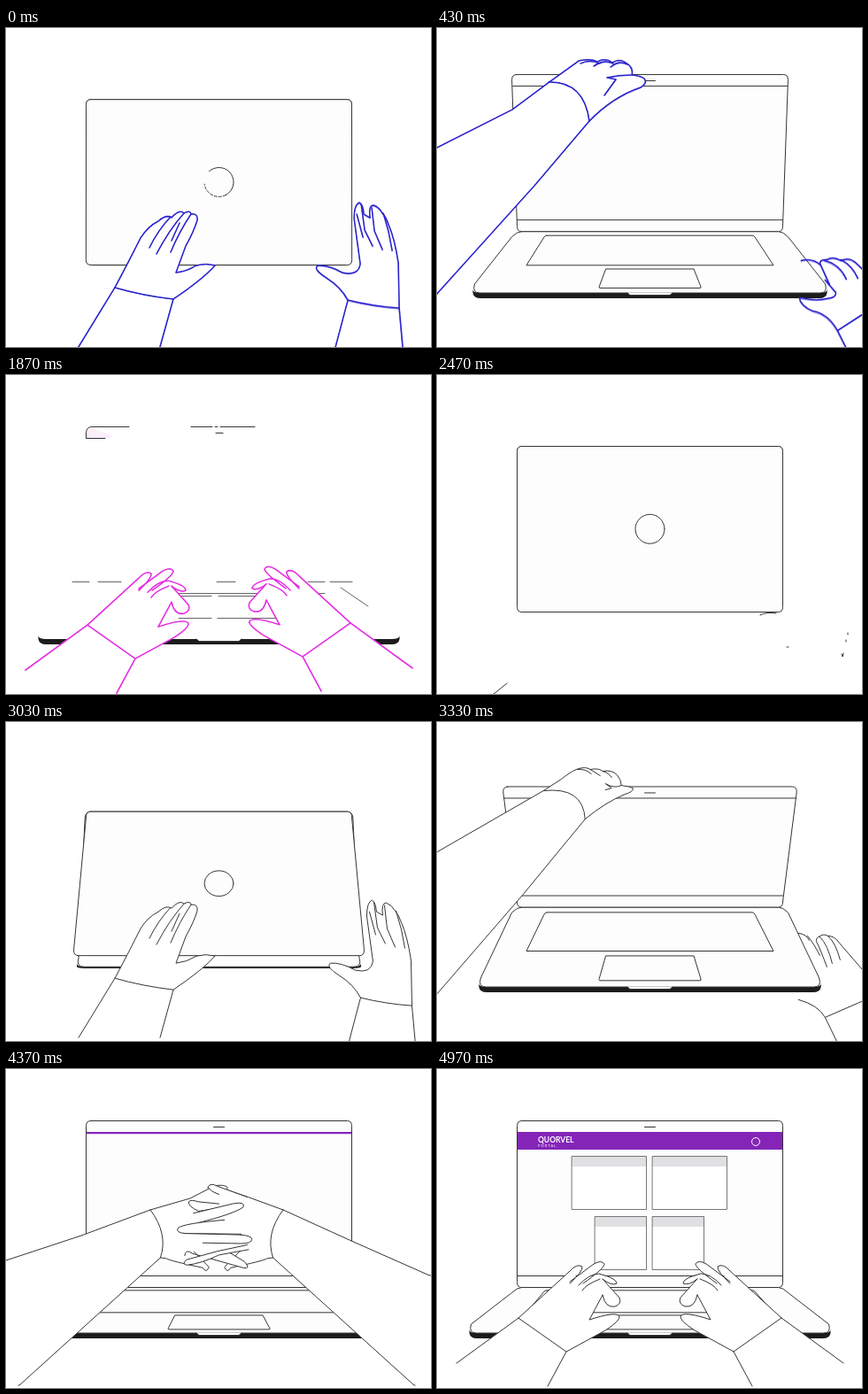
An HTML page with a canvas that plays this animation: 480 px wide and 360 px high, repeating every 5 s.

```html
<!DOCTYPE html>
<html>
<head>
<meta charset="utf-8">
<style>
html, body { margin: 0; width: 100%; height: 100%; overflow: hidden; background: #fff; }
canvas { display: block; width: 480px; height: 360px; }
</style>
</head>
<body>
<canvas id="stage" width="480" height="360"></canvas>
<script>
const ctx = document.getElementById('stage').getContext('2d');
const LOOP = 5000, CLEAN_START = 2430, CLEAN_SHIFT = 2940, CX = 240.5;
const INK = '#353535', BLUE = '#2c25cc', PINK = '#e42fe2', PURPLE = '#8525b8';

const lerp = (a, b, k) => a + (b - a) * k;
const ramp = (q, a, b) => Math.min(1, Math.max(0, (q - a) / (b - a)));
const ease = (q, a, b) => { const k = ramp(q, a, b); return k * k * (3 - 2 * k); };

// time, hinge y, lid edge y, lid edge half width, base front y, base half width
const LAPTOP = [
  [0, 80.5, 267.5, 150, 267.5, 150],
  [130, 110, 262, 170, 280, 165],
  [260, 165, 190, 186, 293, 182],
  [390, 208.5, 73.5, 166, 299, 193],
  [430, 229.5, 52.5, 156, 299, 200],
  [530, 246.5, 58.5, 150, 298, 204]
];

const REST = {
  left: ['M82 360L123 293Q137 267 152 237Q160 224 172 218Q181 210 187 214Q196 204 201 209Q208 205 209 210Q217 209 216 217Q212 230 203 246L192 276Q204 275 215 268Q226 265 236 268Q223 283 189 306L174 360',
    'M123 293Q154 302 189 306M186 213Q171 229 162 248M201 209Q184 228 170 255M209 210Q196 229 186 253M196 220L187 240'],
  right: ['M372 360L386 307Q378 292 362 282Q346 272 352 268Q364 267 380 276Q398 280 400 266L393 215Q393 199 399 197Q403 199 404 210L411 214Q409 200 415 200Q421 202 425 209Q429 213 432 222Q439 238 443 265L444 316L448 360',
    'M386 307Q414 314 444 316M401 199L405 228L414 246M396 210L403 236M413 203L416 229L425 250M426 209L432 230L436 251']
};
const LIFT_SKETCH = {
  time: 430, edge: 52.5, wide: 156,
  left: ['M-40 156L0 135L85 92L128 60Q149 45 160 37Q174 34 181 38Q190 33 198 39Q206 34 213 39Q222 44 220 53Q230 54 234 57Q238 62 230 67Q198 78 172 105L110 178L0 300L-40 345',
    'M126 61Q166 60 172 105M162 40Q172 35 184 40M177 43Q188 35 199 40M196 44Q205 36 215 41M219 53Q205 53 192 56L202 58L189 76'],
  right: 'M411 262Q424 259 433 267Q430 261 440 261Q447 257 456 262Q465 258 472 264L500 290M500 310L452 341Q441 322 424 319Q410 313 409 304Q428 308 440 305Q451 304 450 298L438 284M433 267L443 289M437 262Q454 266 462 283M456 261Q469 268 475 282M452 341L464 365'
};
const LIFT_CLEAN = {
  time: 390, edge: 73.5, wide: 166,
  left: ['M-40 170L0 147L120 78L140 65Q150 57 157 54Q167 50 173 54Q182 52 187 56Q197 54 203 60Q208 66 208 72Q217 73 221 75Q222 79 212 82Q190 91 167 110L97 195L0 307L-40 350',
    'M120 78Q165 73 167 110M158 54Q168 53 174 59M173 54L184 61M187 56Q194 58 197 63M208 72Q200 76 190 70L197 75L190 77'],
  right: 'M408 238Q417 239 420 246M418 241Q425 249 432 263M440 276Q433 257 428 247Q428 242 432 242Q441 251 446 272M431 242Q436 238 441 241Q450 249 455 268M441 241Q449 241 454 249L500 302M500 306L438 333Q430 319 408 313M438 333L455 368'
};
const TYPE = ['M125 358L146 319L190 295Q207 284 206 279Q202 273 172 283L187 255Q190 270 201 268Q209 265 206 258L187 237Q198 244 203 242Q203 236 180 231L165 240Q190 224 189 220Q186 215 177 220L150 240Q165 226 164 223Q158 219 150 228L92 281L22 332L0 358Z',
  'M125 358L146 319L190 295Q207 284 206 279Q202 273 172 283L187 255M92 281L146 319M22 332L92 281L150 228Q158 219 164 223Q165 228 150 242M150 240L177 220Q186 215 189 220Q189 225 165 242M160 244Q172 231 183 231Q203 236 203 242Q197 245 187 237M184 237Q168 243 164 250M187 237L206 258Q209 265 201 268Q190 270 187 255'];

// side (-1 left hand, 1 right hand) and outline
const FINGERS = [
  [1, 'M250 148L212 154Q196 147 197 140Q200 136 211 140L242 143'],
  [-1, 'M225 119Q243 113 253 117Q257 121 250 124L236 126'],
  [1, 'M284 133L240 117Q229 111 226 118Q228 124 242 129'],
  [-1, 'M204 157L262 143Q282 139 278 148Q264 158 212 171'],
  [1, 'M250 167Q190 172 181 179Q177 186 192 187L275 188'],
  [-1, 'M190 187L272 189Q291 190 291 196Q290 202 275 202L218 201'],
  [-1, 'M191 220Q192 209 203 217L278 238Q290 241 280 229L252 212'],
  [1, 'M284 204Q240 212 194 226Q186 232 194 234Q215 232 242 219L286 211']
];

function pen(color, sketch) {
  return { draw(d, fill) {
    const p = new Path2D(d), scale = Math.abs(ctx.getTransform().a);
    if (fill) { ctx.fillStyle = fill; ctx.fill(p); }
    ctx.strokeStyle = color;
    ctx.lineWidth = (sketch ? 1.5 : 1) / scale;
    ctx.stroke(p);
    if (!sketch) return;
    ctx.save();
    ctx.translate(.9, -.6);
    ctx.rotate(.004);
    ctx.lineWidth = .8 / scale;
    ctx.globalAlpha = .7;
    ctx.stroke(p);
    ctx.restore();
  } };
}

function at(x, y, paint, mirror) {
  ctx.save();
  ctx.translate(x, y);
  if (mirror) { ctx.translate(mirror, 0); ctx.scale(-1, 1); }
  paint();
  ctx.restore();
}

function shape(p, [outline, detail], x = 0, y = 0) {
  at(x, y, () => { p.draw(outline, '#fff'); p.draw(detail); });
}

function line(d, color = INK, width = 1) {
  ctx.strokeStyle = color;
  ctx.lineWidth = width;
  ctx.stroke(new Path2D(d));
}

function laptopState(q) {
  q = Math.min(530, Math.max(0, q));
  const i = Math.max(1, LAPTOP.findIndex(row => q <= row[0]));
  const a = LAPTOP[i - 1], b = LAPTOP[i], k = ramp(q, a[0], b[0]);
  const [, hinge, edge, wide, front, base] = a.map((v, n) => lerp(v, b[n], k));
  return { hinge, edge, wide, front, base };
}

function solid(d, fill, stroke = true) {
  ctx.fillStyle = fill;
  ctx.fill(new Path2D(d));
  if (stroke) line(d);
}

function drawBar(s) {
  const l = CX - s.base, r = CX + s.base, f = s.front, t = 6 * ramp(f, 268, 298);
  if (t < .1) return;
  solid(`M${l} ${f - 4}Q${l} ${f} ${l + 9} ${f}H${r - 9}Q${r} ${f} ${r} ${f - 4}V${f}Q${r - 1} ${f + t} ${r - 9} ${f + t}H${l + 9}Q${l + 1} ${f + t} ${l} ${f}Z`, '#1c1c1c', false);
}

function drawNotch(f) {
  solid(`M215 ${f - .5}H266L263 ${f + 2.5}H218Z`, '#fff', false);
  line(`M215 ${f}L218 ${f + 2.5}H263L266 ${f}`);
}

function drawBase(s) {
  const { hinge: h, front: f } = s, l = CX - s.base, r = CX + s.base;
  const y = k => lerp(h, f, k), flare = 6 * ramp(f, 272, 292);
  drawBar(s);
  solid(`M${CX - 145} ${h}H${CX + 145}Q${CX + 150} ${h} ${CX + 150 + flare} ${h + 6}L${r - 2} ${f - 10}Q${r + 1} ${f} ${r - 8} ${f}H${l + 8}Q${l - 1} ${f} ${l + 2} ${f - 10}L${CX - 150 - flare} ${h + 6}Q${CX - 150} ${h} ${CX - 145} ${h}Z`, '#fdfdfd');
  line(`M124 ${y(.065)}H356Q358 ${y(.065)} 359 ${y(.09)}L380 ${y(.55)}H101L121 ${y(.09)}Q122 ${y(.065)} 124 ${y(.065)}`);
  line(`M191 ${y(.61)}H290L298 ${y(.9)}Q299 ${y(.92)} 296 ${y(.92)}H185Q182 ${y(.92)} 183 ${y(.9)}Z`);
  if (f > 290) drawNotch(f);
}

function drawLid(s, sketch) {
  const { hinge: h, edge: e, wide: w } = s, span = h - e;
  const c = Math.max(-6, Math.min(6, span / 8)), l = CX - w, r = CX + w;
  solid(`M${l + 5} ${e}H${r - 5}Q${r} ${e} ${r} ${e + c}L${CX + 150} ${h - c}Q${CX + 150} ${h} ${CX + 145} ${h}H${CX - 145}Q${CX - 150} ${h} ${CX - 150} ${h - c}L${l} ${e + c}Q${l} ${e} ${l + 5} ${e}Z`, '#fdfdfd');
  if (span < 0) {
    const arc = (from, to) => {
      ctx.beginPath();
      ctx.ellipse(CX, (h + e) / 2 - .2, 16.5, 16.5 * -span / 187, 0, from, to);
      ctx.stroke();
    };
    if (!sketch) return arc(0, 7);
    arc(-2.3, 1.1);
    ctx.setLineDash([3, 2]);
    arc(1.1, 3);
    ctx.setLineDash([]);
    return;
  }
  const m = Math.min(13, span * .1);
  line(`M${l + 1} ${e + m}H${r - 1}M${CX - 150} ${h - m}H${CX + 150}`);
  line(`M${CX - 6} ${e + m / 2 + .5}H${CX + 6}`);
}

function drawTraces(s) {
  solid('M91 71V64L97 60L119 68V71Z', '#fbeefb', false);
  drawBar(s);
  drawNotch(s.front);
  line('M90.5 71.5V65Q91 58.5 97 58.5H139M209 58.5H233M236 58.5H239M242 58.5H281M91 71.5H112M237 65.5H245');
  line('M75 233.5H94M104 233.5H130M238 233.5H259M341 233.5H360M366 233.5H391M136 246.5H150M178 246.5H360M184 249.5H232M240 249.5H356', '#666');
  line('M109 266L102 274.5H170M195 274.5H232M239 274.5H380L374 266M378 240L409 261', '#666');
  line('M274 279.5H292', PINK);
}

function drawCard(x, y, w, k) {
  if (k <= 0) return;
  ctx.save();
  ctx.globalAlpha = k;
  ctx.translate(0, (1 - k) * 18);
  ctx.fillStyle = '#fff';
  ctx.fillRect(x, y, w, 61);
  ctx.fillStyle = '#e0e0e3';
  ctx.fillRect(x, y, w, 12);
  ctx.strokeStyle = '#777';
  ctx.lineWidth = 1;
  ctx.strokeRect(x + .5, y + .5, w - 1, 60);
  ctx.restore();
}

function drawScreen(q) {
  const height = 20 * ease(q, 1390, 1590);
  if (!height) return;
  ctx.save();
  ctx.beginPath();
  ctx.rect(91, 71, 299, height);
  ctx.clip();
  ctx.fillStyle = PURPLE;
  ctx.fillRect(91, 71, 299, 20);
  ctx.globalAlpha = ramp(q, 1500, 1600);
  ctx.fillStyle = '#fff';
  ctx.font = 'bold 8.5px Lato, sans-serif';
  ctx.fillText('QUORVEL', 114, 83);
  ctx.font = '4px Lato, sans-serif';
  ctx.fillText('P O R T A L', 114, 87.5);
  ctx.strokeStyle = '#fff';
  ctx.lineWidth = 1;
  ctx.beginPath();
  ctx.arc(360, 82, 4.5, 0, 7);
  ctx.stroke();
  ctx.restore();
  [[152, 98, 85], [243, 98, 85], [178, 166, 59], [243, 166, 59]].forEach(([x, y, w], i) =>
    drawCard(x, y, w, ease(q, 1620 + i * 60, 1780 + i * 60)));
}

function drawForearm(p, k, drop) {
  const scale = lerp(1, .76, k);
  const px = x => 236 + (x - 236) * scale, py = y => 181 + (y - 181) * scale;
  const top = [px(140), py(152)], low = [px(155), py(223)];
  const far = lerp(163, 216, k) + drop, footX = lerp(0, 15, k), foot = lerp(265 + drop, 357, k);
  const bendX = (footX + low[0]) / 2, bendY = (foot + low[1]) / 2 - 11 * (1 - k);
  const upper = `M${top}L85 ${lerp(155, 188, k) + drop * .4}L0 ${far}L-300 ${far + 100}`;
  const lower = `L${footX} ${foot}Q${bendX} ${bendY} ${low}`;
  ctx.fillStyle = '#fff';
  ctx.fill(new Path2D(`${upper}L-300 ${foot + 90}${lower}Z`));
  p.draw(upper);
  p.draw(`M${footX - 1} ${foot}${lower}M${top}Q${px(lerp(148, 167, k))} ${py(188)} ${low}`);
  if (k < .5) p.draw(`M0 ${foot}L24 360`);
}

function drawPalm(p, k, right) {
  const x = lerp(right ? 181 : 190, 223, k), y = lerp(255, 242, k);
  ctx.fillStyle = '#fff';
  ctx.fill(new Path2D('M140 152L230 120L240 120V218L190 216L155 223Z'));
  p.draw(right ? 'M140 152L192 133L236 118' : 'M140 152L199 135L232 118');
  p.draw(`M155 223L163 224Q170 228 ${x - 5} ${y - 4}Q${x} ${y + 5} ${x + 4} ${y - 5}L${lerp(193, 205, k)} 214`, '#fff');
}

function drawClasp(p, q) {
  const k = ease(q, 1200, 1335) * (1 - ease(q, 1530, 1640));
  const gap = 270 * (1 - ease(q, 690, 1000)) + 170 * ease(q, 1620, 1735);
  const scaled = paint => at(236, 181, () => {
    const scale = lerp(1, .76, k);
    ctx.scale(scale, scale);
    ctx.translate(-236, -181);
    paint();
  });
  for (const side of [-1, 1]) {
    const right = side > 0;
    at(side * gap, 0, () => {
      scaled(() => drawPalm(p, k, right));
      drawForearm(p, k, right ? 16 : 0);
    }, right ? 476 : 0);
  }
  for (const [side, d] of FINGERS) {
    at(side * gap, 0, () => scaled(() => p.draw(d, '#fff')));
  }
}

function drawTyping(p, q) {
  const out = 1 - ease(q, 1735, 1860);
  const bob = q > 1860 ? 3 * Math.sin((q - 2030) / 45) : 0;
  for (const side of [-1, 1]) {
    at(side * out * 60, out * 70 - side * bob, () => {
      ctx.fillStyle = '#fff';
      ctx.fill(new Path2D(TYPE[0]));
      p.draw(TYPE[1]);
    }, side > 0 ? 481 : 0);
  }
}

function drawLift(p, q, s, lift) {
  const leave = ease(q, 560, 750), back = Math.min(2, Math.max(-1, (lift.time - q) / 40));
  shape(p, lift.left, lift.wide - Math.max(156, s.wide) - 290 * leave, (s.edge - lift.edge) * .8 + 30 * leave);
  at(90 * leave - 14 * back, 30 * leave - 14 * back, () => p.draw(lift.right));
}

function drawHands(q, s, sketch) {
  const first = pen(sketch ? BLUE : INK, sketch), second = pen(sketch ? PINK : INK, sketch);
  if (q < -450) {
    line('M64 360L79 348M365 271Q372 267 383 269M395 307H397M457 315L458 318L459 314M464 291V293M462 299V301');
  } else if (q < 220) {
    const away = 1 - ease(q, -450, -60), k = ramp(q, 0, 220);
    shape(first, REST.left, -120 * away, 150 * away + s.edge - 267.5);
    shape(first, REST.right, 70 * away + 35 * k, 60 * away + 10 * k);
  } else if (q < 760) {
    drawLift(first, q, s, sketch ? LIFT_SKETCH : LIFT_CLEAN);
  }
  if (q > 690 && q < 1735) drawClasp(second, q);
  if (q >= 1735) drawTyping(second, q);
}

function frame(now) {
  const t = now % LOOP, sketch = t < CLEAN_START;
  const q = sketch ? t : t - CLEAN_SHIFT;
  const s = laptopState(q);
  ctx.fillStyle = '#fff';
  ctx.fillRect(0, 0, 480, 360);
  ctx.lineCap = ctx.lineJoin = 'round';
  if (sketch && q > 900) drawTraces(s);
  else {
    drawBase(s);
    drawLid(s, sketch);
    if (!sketch) drawScreen(q);
  }
  drawHands(q, s, sketch);
}

const start = performance.now();
function tick() {
  frame(performance.now() - start);
  requestAnimationFrame(tick);
}
tick();
</script>
</body>
</html>
```
